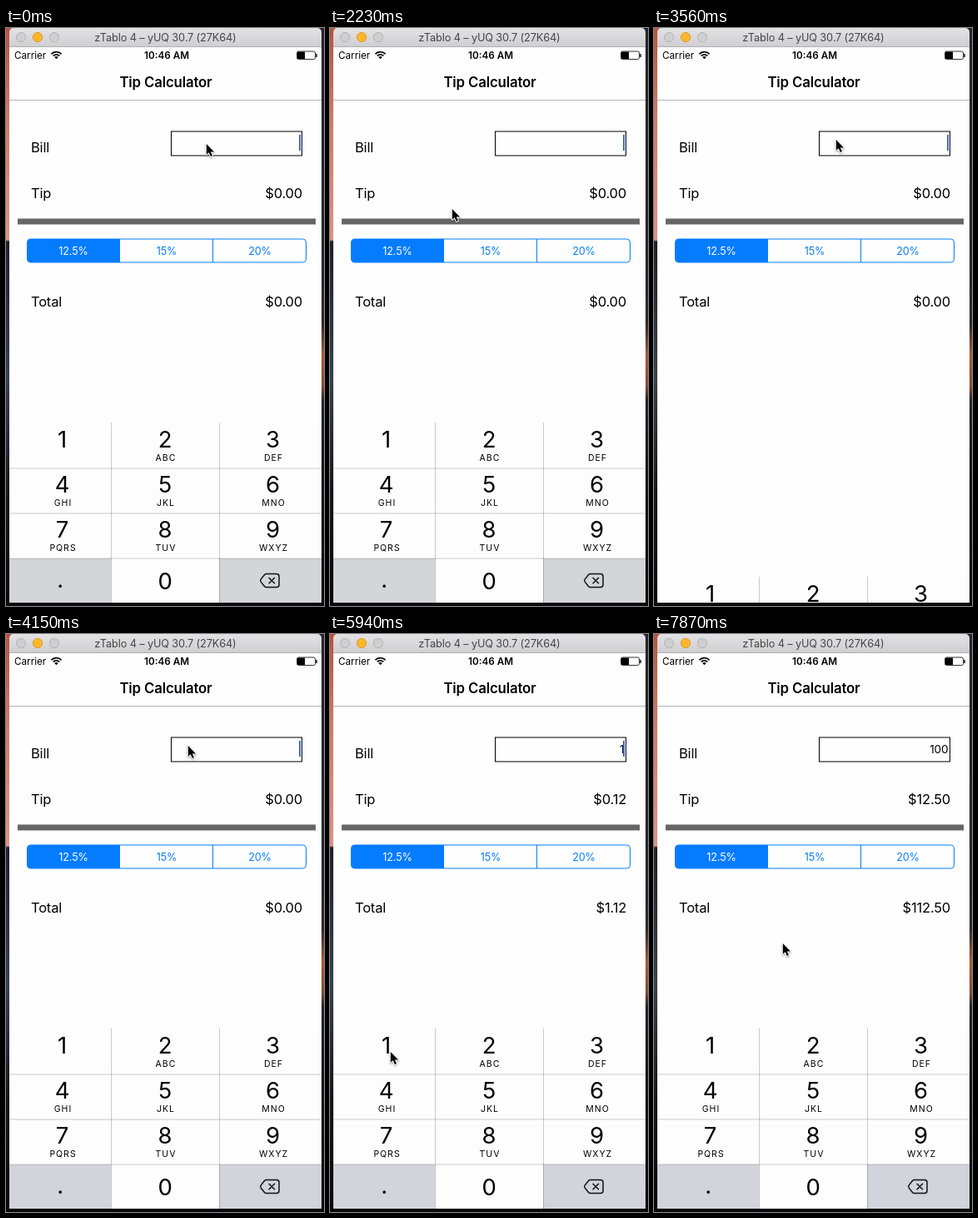
An HTML page with a canvas that plays this animation: 382x693 px, repeating every 8 s.

```html
<!DOCTYPE html>
<html lang="en">
<head>
<meta charset="utf-8">
<title>Tip Calculator</title>
<style>
html, body { margin: 0; width: 100%; height: 100%; overflow: hidden; background: #0b0c10; }
canvas { display: block; width: 382px; height: 693px; }
</style>
</head>
<body>
<canvas id="stage" width="382" height="693"></canvas>
<script>
const ctx = document.getElementById('stage').getContext('2d');
const LOOP = 8000, STEP = 4000 / 27;
const BLUE = '#057cff', LINE = 'rgba(0, 0, 0, 0.2)';
const SANS = 'Inter, Roboto, sans-serif';

// Pointer path: step, x, y
const path = [
  [3, 240, 138], [5, 214, 192], [8, 150, 281], [10, 147, 268], [13, 146, 228],
  [15, 146, 216], [18, 146, 216], [20, 160, 190], [22, 212, 119], [23, 218, 133],
  [31, 218, 133], [33, 196, 260], [36, 148, 532], [38, 80, 508], [39, 72, 500],
  [41, 72, 500], [44, 168, 648], [45, 174, 665], [50, 174, 665], [51, 170, 620],
  [52, 158, 440], [53, 154, 370]
];
const keys = ['', 'ABC', 'DEF', 'GHI', 'JKL', 'MNO', 'PQRS', 'TUV', 'WXYZ'];
const centers = [67.5, 191, 320.5];

function pointerAt(step) {
  let a = path[0];
  for (const b of path) {
    if (step <= b[0]) {
      const k = b[0] > a[0] ? Math.max(0, (step - a[0]) / (b[0] - a[0])) : 0;
      return [a[1] + (b[1] - a[1]) * k, a[2] + (b[2] - a[2]) * k];
    }
    a = b;
  }
  return [a[1], a[2]];
}

// Critically damped spring: 1 at the start, settling at 0
function spring(ms) {
  if (ms <= 0) return 1;
  const w = ms * 0.01825;
  return (1 + w) * Math.exp(-w);
}

function keyboardOffset(t) {
  return 216 * (t < 3000 ? 1 - spring(t - 2345) : spring(t - 3519));
}

function caretOn(t, step) {
  if (step < 16) return t % 1000 < 700 || t % 1000 >= 1170;
  if (step < 24) return false;
  if (step < 29) return true;
  if (step < 40) return ((t - 4740) % 1000 + 1000) % 1000 < 500;
  return step < 53;
}

function rect(x, y, w, h, color) {
  ctx.fillStyle = color;
  ctx.fillRect(x, y, w, h);
}

function text(s, x, y, size, { align = 'left', weight = 400, color = '#000', track = -0.2 } = {}) {
  ctx.font = `${weight} ${size}px ${SANS}`;
  ctx.letterSpacing = track + 'px';
  ctx.textAlign = align;
  ctx.fillStyle = color;
  ctx.fillText(s, x, y);
}

function shape(d, x, y, fill, stroke, width = 1) {
  const p = new Path2D(d);
  ctx.save();
  ctx.translate(x, y);
  ctx.lineJoin = ctx.lineCap = 'round';
  if (stroke) {
    ctx.strokeStyle = stroke;
    ctx.lineWidth = width;
    ctx.stroke(p);
  }
  if (fill) {
    ctx.shadowColor = 'transparent';
    ctx.fillStyle = fill;
    ctx.fill(p);
  }
  ctx.restore();
}

function strip(x, w, stops) {
  const g = ctx.createLinearGradient(0, 0, 0, 693);
  stops.forEach(([y, c]) => g.addColorStop(y / 693, c));
  rect(x, 0, w, 693, g);
}

function drawBackdrop() {
  strip(0, 10, [[0, '#b5553f'], [110, '#cf7a68'], [254, '#dc9484'], [256, '#1d222c'],
    [420, '#39414c'], [560, '#14161c'], [693, '#050506']]);
  strip(372, 10, [[0, '#24242e'], [250, '#24262f'], [355, '#30282a'],
    [392, '#a95a34'], [430, '#8a4a30'], [446, '#22252d'], [560, '#111217'], [693, '#050506']]);
  rect(0, 689, 382, 4, '#08080a');
}

function drawTitleBar() {
  const g = ctx.createLinearGradient(0, 0, 0, 22);
  g.addColorStop(0, '#e3e2e4');
  g.addColorStop(1, '#cfced1');
  ctx.fillStyle = g;
  ctx.beginPath();
  ctx.roundRect(4, 0, 375, 26, [5, 5, 0, 0]);
  ctx.fill();
  rect(4, 22, 375, 1, '#b0afb2');
  [[18, '#cfced0', '#b3b2b5'], [38, '#fdb62c', '#dd9c25'], [58, '#cfced0', '#b3b2b5']].forEach(([x, fill, edge]) => {
    ctx.beginPath();
    ctx.arc(x, 11, 5.6, 0, 7);
    ctx.fillStyle = fill;
    ctx.fill();
    ctx.strokeStyle = edge;
    ctx.lineWidth = 1;
    ctx.stroke();
  });
  text('zTablo 4 – yUQ 30.7 (27K64)', 191.5, 16, 12.7, { align: 'center', color: '#454447', track: -0.1 });
}

function drawStatusBar() {
  text('Carrier', 10, 37, 11.7, { track: 0 });
  text('10:46 AM', 193, 37, 11.7, { align: 'center', weight: 600, track: 0 });
  ctx.strokeStyle = '#000';
  ctx.lineWidth = 1.8;
  ctx.lineCap = 'butt';
  [5.2, 8.4].forEach(r => {
    ctx.beginPath();
    ctx.arc(60.5, 37, r, -Math.PI * 0.76, -Math.PI * 0.24);
    ctx.stroke();
  });
  shape('M0 0L-2.4 -2.6Q0 -4.2 2.4 -2.6Z', 60.5, 37.3, '#000');
  ctx.lineWidth = 0.8;
  ctx.beginPath();
  ctx.roundRect(349.5, 28, 22, 9.5, 2);
  ctx.stroke();
  rect(350, 28.5, 9, 8.5, '#000');
  rect(372.3, 31, 1.4, 4, '#000');
}

function drawSegments() {
  ctx.save();
  ctx.beginPath();
  ctx.roundRect(25.5, 253, 335, 28, 4);
  ctx.strokeStyle = BLUE;
  ctx.lineWidth = 1;
  ctx.stroke();
  ctx.clip();
  rect(25, 252, 112, 30, BLUE);
  rect(248, 252, 1, 30, BLUE);
  ctx.restore();
  ['12.5%', '15%', '20%'].forEach((s, i) =>
    text(s, 81 + i * 112, 271.5, 12.6, { align: 'center', color: i ? BLUE : '#fff', track: -0.1 }));
}

const money = v => '$' + (Math.floor(v * 100 + 1e-6) / 100).toFixed(2);

function drawForm(bill, caret) {
  text('Tip Calculator', 192, 70.5, 16.8, { align: 'center', weight: 600, track: -0.15 });
  rect(4, 86, 375, 1, '#b4b4b4');
  const right = { align: 'right' };
  text('Bill', 30, 148.5, 16.5);
  text('Tip', 30, 203.5, 16.5);
  text('Total', 30, 333.5, 16.5);
  text(money(bill * 0.125), 356, 203.5, 16.5, right);
  text(money(bill * 1.125), 356, 333.5, 16.5, right);
  ctx.strokeStyle = '#000';
  ctx.lineWidth = 1;
  ctx.strokeRect(198.5, 124, 157, 29);
  if (bill) text(bill, 353.3, 143, 13.6, right);
  if (caret) rect(352, 128, 2, 19, '#3f69e8');
  rect(14, 228.5, 358, 7, '#666');
  drawSegments();
}

function drawKeyboard(offset, pressed, gray) {
  ctx.save();
  ctx.translate(0, offset);
  rect(4, 473, 375, 216, '#fdfdfd');
  rect(4, 636, 122, 53, gray);
  rect(256, 636, 123, 53, gray);
  if (pressed === 1) rect(4, 473, 122, 54, gray);
  if (pressed === 0) rect(126, 636, 130, 53, gray);
  [527.5, 581.5, 635.5].forEach(y => rect(4, y, 375, 1, LINE));
  [126, 256].forEach(x => rect(x, 473, 1, 216, LINE));
  keys.forEach((letters, i) => {
    const x = centers[i % 3], y = 503 + Math.floor(i / 3) * 54;
    text(i + 1, x, y, 27.5, { align: 'center' });
    text(letters, x + 1, y + 16, 10.5, { align: 'center', track: 1 });
  });
  text('0', 191, 672.5, 27.5, { align: 'center' });
  text('.', 65, 671, 27.5, { align: 'center' });
  shape('M7 0H19.5Q22.5 0 22.5 3V13Q22.5 16 19.5 16H7Q6 16 5 15L0.6 9.4Q-0.4 8 0.6 6.6L5 1Q6 0 7 0ZM10.5 4.8L17 11.2M17 4.8L10.5 11.2',
    305.5, 654.5, null, '#111', 1.5);
  ctx.restore();
}

function drawPointer(x, y) {
  ctx.save();
  ctx.shadowColor = 'rgba(0, 0, 0, 0.4)';
  ctx.shadowBlur = 2;
  ctx.shadowOffsetY = 1;
  shape('M0 0V12.8L2.9 10.2L5.1 15L7.1 14.1L5 9.4H9.2Z', x + 0.8, y + 1, '#000', '#fff', 2);
  ctx.restore();
}

function draw(now) {
  const step = Math.floor((now % LOOP + 3) / STEP);
  const t = step * STEP;
  const bill = step < 40 ? '' : step < 46 ? '1' : step < 49 ? '10' : '100';
  const pressed = step === 39 ? 1 : step === 45 || step === 48 ? 0 : -1;

  drawBackdrop();
  drawTitleBar();
  ctx.save();
  ctx.beginPath();
  ctx.rect(4, 23, 375, 666);
  ctx.clip();
  rect(4, 23, 375, 666, '#fefefe');
  drawStatusBar();
  drawForm(bill, caretOn(t, step));
  drawKeyboard(keyboardOffset(t), pressed, step < 20 ? '#d4d5d9' : '#d1d4da');
  ctx.restore();
  drawPointer(...pointerAt(step));
}

const start = performance.now();
function tick() {
  draw(performance.now() - start);
  requestAnimationFrame(tick);
}
tick();
</script>
</body>
</html>
```
